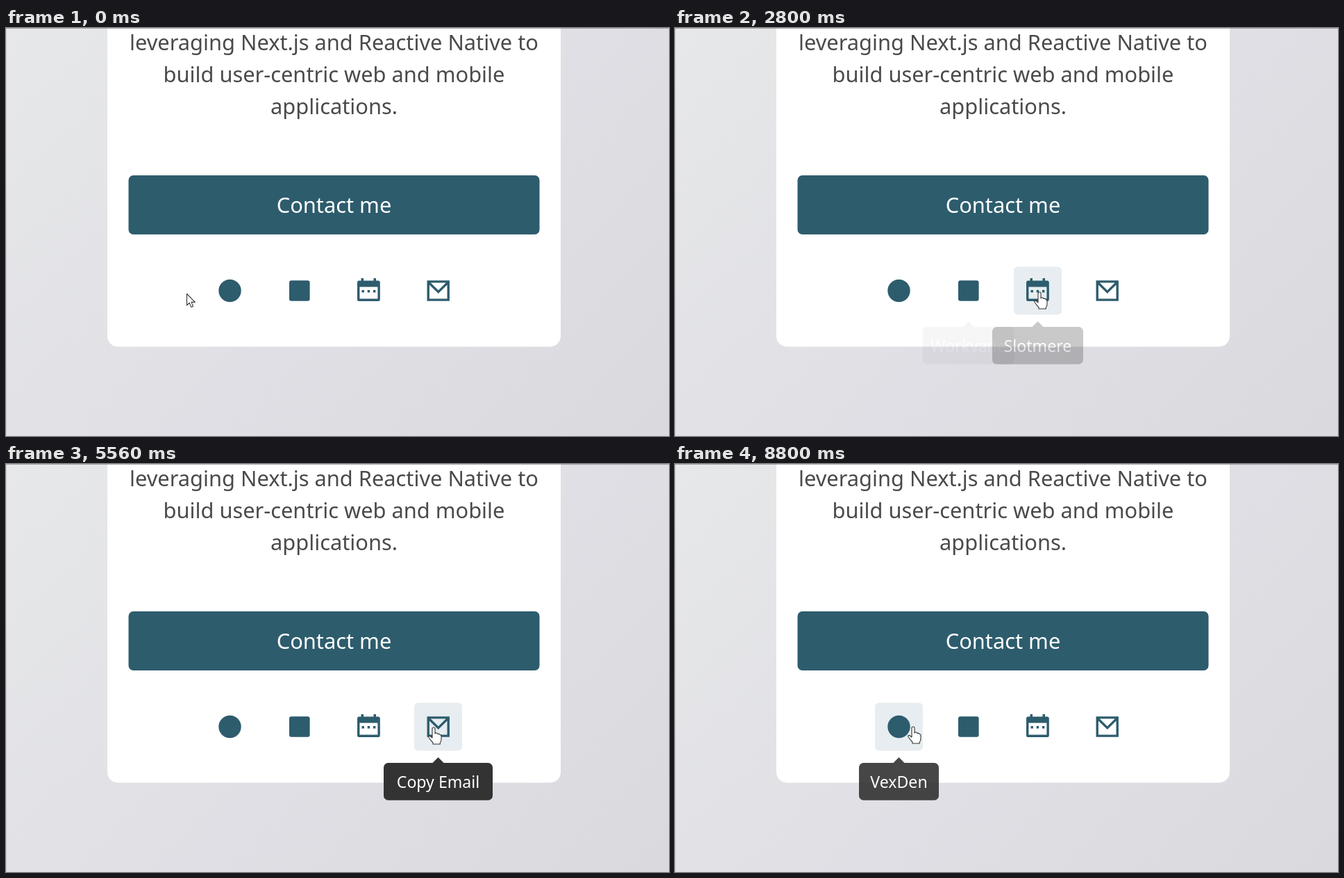
Recreate the animation shown at these times as an HTML page. Size 955 by 587 pixels, loop 8.84 s.

```html
<!DOCTYPE html>
<html lang="en">
<head>
<meta charset="utf-8">
<title>Contact card</title>
<style>
  html, body { margin: 0; width: 100%; height: 100%; overflow: hidden; }
  body { background: linear-gradient(135deg, #e7e8e9, #dfdfe5 55%, #d9d9de); }
  svg { display: block; width: 955px; height: 587px; }
  text { font: 30.8px "Noto Sans", sans-serif; text-anchor: middle; fill: #4a4a4a; }
  .light { fill: #fff; }
  .tip text { font-size: 23.1px; }
  .brand { fill: #2d5c6d; }
</style>
</head>
<body>
<svg viewBox="0 0 955 587">
  <path d="M146 0H799V443.5a15 15 0 0 1-15 15H161a15 15 0 0 1-15-15Z" fill="#fff"/>
  <text x="472.5" y="32">leveraging Next.js and Reactive Native to</text>
  <text x="472.5" y="78">build user-centric web and mobile</text>
  <text x="472.5" y="124.3">applications.</text>
  <rect class="brand" x="176.5" y="212" width="592" height="85" rx="7"/>
  <text class="light" x="472.5" y="266.3">Contact me</text>

  <g id="hovers"></g>
  <circle class="brand" cx="322.5" cy="378" r="16.2"/>
  <rect class="brand" x="408" y="363.2" width="29.6" height="29.6" rx="3"/>
  <path class="brand" fill-rule="evenodd" d="M508 363.5H511.5V360H515V363.5H529.5V360H533V363.5H536.5Q538.8 363.5 538.8 366V390.5Q538.8 393 536.5 393H508.5Q506 393 506 390.5V366Q506 363.5 508 363.5ZM509.4 372.5V389.6H535.4V372.5Z"/>
  <path class="brand" d="M512.5 377h3.4v3.4h-3.4zm8.2 0h3.4v3.4h-3.4zm8.2 0h3.4v3.4h-3.4z"/>
  <path d="M608.2 364.9H637.2V391.1H608.2ZM608.2 365.5L622.7 379.7L637.2 365.5" fill="none" stroke="#2d5c6d" stroke-width="3.4"/>
  <g id="tips"></g>

  <circle id="click" cx="614" cy="378" r="13.5" fill="#8080d0" fill-opacity=".7" stroke="#6868c0" stroke-opacity=".6"/>
  <g id="cursor" fill="#fff" stroke="#333" stroke-width="1.1" stroke-linejoin="round">
    <path id="arrow" d="M.5 .5V17L4.2 13.4L6.8 19.6L9.6 18.4L7 12.4H12.3Z"/>
    <path id="hand" d="M-2 2Q-2 0 0 0T2 2V9Q2 7.5 4 8T6 9.5Q8 8.5 9 10.5Q11 10.5 11 13V17Q11 20 9.3 22V24H-1V22Q-4 19 -7 14.5Q-8 12 -5 12.5L-2 15Z"/>
  </g>
  <path d="M0 .5H955" stroke="#77777c" stroke-opacity=".6"/>
  <path d="M.5 0V587" stroke="#77777c" stroke-opacity=".2"/>
</svg>
<script>
const LOOP = 8840, TIP_IN = 120, TIP_OUT = 70, FADE = 200;
const $ = id => document.getElementById(id);
const clamp = v => Math.max(0, Math.min(1, v));

// label, icon centre, tooltip width
const icons = [
  ['VexDen', 322.5, 115],
  ['Workvane', 422.5, 132],
  ['Slotmere', 522.5, 131],
  ['Copy Email', 622.5, 157]
];

// cursor stops: time, x, y
const path = [
  [0, 260, 382], [120, 260, 382], [600, 325, 381], [1150, 325, 381],
  [1700, 431, 376], [2400, 431, 376], [2800, 525, 380], [3120, 525, 380],
  [3460, 571, 378], [3800, 616, 379], [6350, 616, 379], [6800, 564, 379],
  [7150, 525, 380], [7350, 525, 380], [7840, 447, 380], [8100, 447, 380],
  [8620, 343, 378], [LOOP, 343, 378]
];

for (const [label, x, w] of icons) {
  $('hovers').innerHTML +=
    `<rect x="${x - 34.5}" y="343.5" width="69" height="69" rx="6" fill="#e7edf0"/>`;
  $('tips').innerHTML +=
    `<g class="tip"><path d="M${x - 8.5} 430.5L${x} 422L${x + 8.5} 430.5Z" fill="#333"/>
     <rect x="${x - w / 2}" y="430" width="${w}" height="53.7" rx="6.5" fill="#333"/>
     <text class="light" x="${x}" y="465.8">${label}</text></g>`;
}

function cursorAt(t) {
  const i = path.findIndex(p => p[0] > t);
  const [t0, x0, y0] = path[i - 1], [t1, x1, y1] = path[i];
  const s = (t - t0) / (t1 - t0), e = s * s * (3 - 2 * s);
  return [x0 + (x1 - x0) * e, y0 + (y1 - y0) * e];
}

const iconAt = x => icons.findIndex(icon => Math.abs(x - icon[1]) < 34.5);

// Walk the path once to find when each icon is entered and left.
const visits = [];
for (let t = 0, last = -1; t < LOOP; t++) {
  const now = iconAt(cursorAt(t)[0]);
  if (now === last) continue;
  if (last >= 0) visits[visits.length - 1].leave = t;
  if (now >= 0) visits.push({ icon: now, enter: t, leave: Infinity });
  last = now;
}

function tipOpacity(icon, t) {
  return Math.max(...visits.filter(v => v.icon === icon).map(v =>
    Math.min(clamp((t - v.enter - TIP_IN) / FADE),
             1 - clamp((t - v.leave - TIP_OUT) / FADE))));
}

function draw(t) {
  const [x, y] = cursorAt(t), over = iconAt(x);
  icons.forEach((_, i) => {
    $('hovers').children[i].style.opacity = +(i === over);
    $('tips').children[i].style.opacity = tipOpacity(i, t);
  });
  $('cursor').setAttribute('transform', `translate(${x} ${y})`);
  $('arrow').style.opacity = +(over < 0);
  $('hand').style.opacity = +(over >= 0);
  $('click').style.opacity = t < 4420 ? 0 : 1 - clamp((t - 4420) / 280);
}

const start = performance.now();
function frame() {
  draw((performance.now() - start) % LOOP);
  requestAnimationFrame(frame);
}
frame();
</script>
</body>
</html>
```
